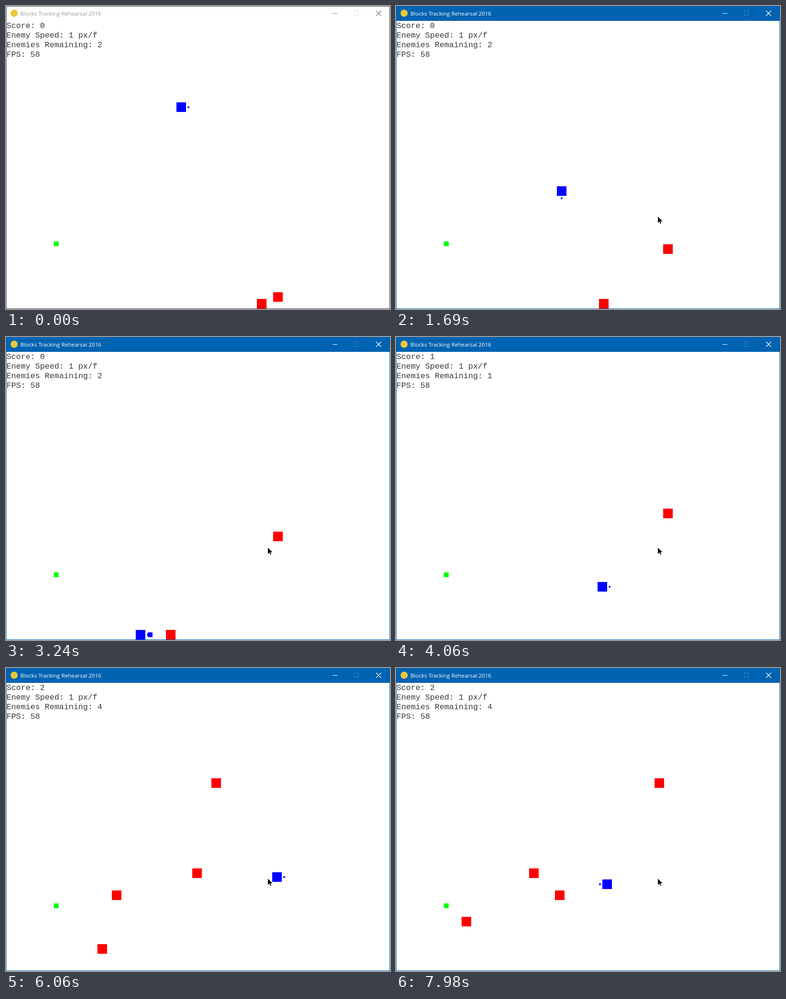
Animation, 802 px wide and 632 px high, one loop 8 s. Source, as an HTML page:

```html
<!DOCTYPE html>
<html lang="en">
<head>
<meta charset="utf-8">
<title>Blocks Tracking Rehearsal 2016</title>
<style>
  html, body { margin: 0; width: 100%; height: 100%; overflow: hidden; background: #fff; }
  svg { display: block; width: 802px; height: 632px; }
  .title { font: 11.65px "Open Sans", "Noto Sans", sans-serif; }
  .hud { font: 16.667px "Liberation Mono", "Courier New", monospace; white-space: pre; }
  rect, .crisp { shape-rendering: crispEdges; }
</style>
</head>
<body>
<svg id="stage" viewBox="0 0 802 632">
  <rect width="802" height="632" fill="#fff"/>
  <rect id="bar" width="802" height="31"/>
  <rect id="border" x=".5" y=".5" width="801" height="631" fill="none"/>
  <circle cx="17" cy="15" r="7.5" fill="#e9c63c"/>
  <text id="caption" class="title" x="30" y="20">Blocks Tracking Rehearsal 2016</text>
  <g id="buttons" fill="none">
    <path class="crisp" d="M682 15.5h10"/>
    <path d="M773 10l10.5 10.5M783.5 10l-10.5 10.5" stroke-width="1.2"/>
  </g>
  <rect id="maximize" x="727.5" y="10.5" width="9" height="9" fill="none"/>
  <g id="hud" class="hud" fill="#3a3a3a"></g>
  <rect x="100" y="491" width="10" height="10" fill="#0f0"/>
  <g id="enemies" fill="#f00"></g>
  <g id="bullets" fill="#00f"></g>
  <g id="player" fill="#00f">
    <rect width="20" height="20"/>
    <path id="aim" class="crisp" d="M-1-2h2v1h1v2h-1v1h-2v-1h-1v-2h1z"/>
  </g>
  <path id="cursor" class="crisp" d="M547 440v12l3-3 2 5h2l-2-5h4z"/>
</svg>
<script>
const LOOP = 8000, ACTIVATED = 300, FIRST_HIT = 3280, SECOND_HIT = 5460;
const $ = id => document.getElementById(id);
const DIRS = { R: [1, 0], L: [-1, 0], U: [0, -1], D: [0, 1] };

// time, x, y, facing from that time on
const playerPath = [
  [0, 356, 201, 'R'], [440, 356, 201, 'R'], [647, 416, 201, 'D'],
  [940, 416, 286, 'D'], [1214, 416, 366, 'D'], [1400, 416, 366, 'L'],
  [1650, 346, 366, 'D'], [1940, 261, 451, 'D'], [2400, 261, 451, 'D'],
  [2950, 261, 611, 'D'], [3040, 261, 611, 'R'], [3075, 271, 611, 'R'],
  [3370, 271, 611, 'R'], [3546, 271, 561, 'R'], [3717, 321, 511, 'R'],
  [4060, 421, 511, 'R'], [4660, 596, 511, 'R'], [4850, 596, 511, 'U'],
  [4930, 596, 511, 'U'], [4950, 601, 506, 'U'], [5070, 601, 471, 'U'],
  [5225, 556, 426, 'U'], [6045, 556, 426, 'R'], [6060, 556, 426, 'R'],
  [6270, 616, 426, 'R'], [6340, 616, 426, 'L'], [6560, 551, 426, 'L'],
  [6645, 526, 401, 'L'], [6850, 466, 401, 'L'], [7220, 466, 401, 'D'],
  [7260, 466, 411, 'D'], [7363, 466, 441, 'D'], [7700, 466, 441, 'L'],
  [7820, 431, 441, 'L']
];

// each enemy lives from its first to its last time
const enemyPaths = [
  [[0, 524, 611], [940, 468, 611], [2380, 384, 611], [FIRST_HIT, 332, 611]],
  [[0, 558, 597], [940, 558, 541], [2380, 558, 457], [4060, 558, 358], [SECOND_HIT, 558, 277]],
  [[SECOND_HIT, 394, 230], [6060, 429, 230], [7260, 498, 230], [7980, 540, 230], [LOOP, 541, 230]],
  [[SECOND_HIT, 424, 418], [6060, 389, 418], [7260, 320, 418], [7980, 278, 418], [LOOP, 277, 418]],
  [[SECOND_HIT, 186, 464], [6060, 221, 464], [7260, 290, 464], [7980, 332, 464], [LOOP, 333, 464]],
  [[SECOND_HIT, 191, 611], [6060, 191, 576], [7051, 191, 519], [7260, 179, 519], [7980, 137, 519], [LOOP, 136, 519]]
];

// fired, gone, x, y, direction
const shots = [
  [3235, FIRST_HIT, 296, 616, 'R'], [3350, 3900, 296, 616, 'R'],
  [5327, SECOND_HIT, 561, 411, 'U'], [5420, 5853, 561, 411, 'U'],
  [6955, 7432, 451, 406, 'L']
];

const fasterSpells = [[3500, 3650], [6300, 6450], [6750, 6900], [7600, 7750]];

function add(parent, tag, attrs) {
  const el = document.createElementNS('http://www.w3.org/2000/svg', tag);
  set(el, attrs);
  return parent.appendChild(el);
}

function set(el, attrs) {
  for (const key in attrs) el.setAttribute(key, attrs[key]);
}

function place(path, t) {
  let i = 0;
  while (i < path.length - 1 && path[i + 1][0] <= t) i++;
  const from = path[i], to = path[i + 1] || from;
  const k = to === from ? 0 : (t - from[0]) / (to[0] - from[0]);
  return { x: from[1] + (to[1] - from[1]) * k, y: from[2] + (to[2] - from[2]) * k, dir: from[3] };
}

const snap = v => 5 * Math.round((v - 1) / 5) + 1;
const show = (el, on) => set(el, { visibility: on ? 'visible' : 'hidden' });

const lines = [0, 1, 2, 3].map(i => add($('hud'), 'text', { x: 1, y: 46 + 20 * i }));
const enemies = enemyPaths.map(() => add($('enemies'), 'rect', { width: 20, height: 20 }));
const bullets = shots.map(() => add($('bullets'), 'rect', { width: 10, height: 10 }));

function drawWindow(active) {
  set($('bar'), { fill: active ? '#0063b1' : '#fff' });
  set($('border'), { stroke: active ? '#0063b1' : '#3c3c3c' });
  set($('caption'), { fill: active ? '#fff' : '#999' });
  set($('buttons'), { stroke: active ? '#fff' : '#777' });
  set($('maximize'), { stroke: active ? '#3383c1' : '#e2e2e2' });
  show($('cursor'), active);
}

function drawHud(t) {
  const score = (t >= FIRST_HIT) + (t >= SECOND_HIT);
  const fps = fasterSpells.some(([a, b]) => t >= a && t < b) ? 59 : 58;
  [`Score: ${score}`, 'Enemy Speed: 1 px/f', `Enemies Remaining: ${[2, 1, 4][score]}`, `FPS: ${fps}`]
    .forEach((text, i) => { if (lines[i].textContent !== text) lines[i].textContent = text; });
}

function draw(t) {
  drawWindow(t >= ACTIVATED);
  drawHud(t);

  const { x, y, dir } = place(playerPath, t);
  const [dx, dy] = DIRS[dir];
  set($('player'), { transform: `translate(${snap(x)} ${snap(y)})` });
  set($('aim'), { transform: `translate(${10 + 15 * dx} ${10 + 15 * dy})` });

  enemies.forEach((el, i) => {
    const path = enemyPaths[i], p = place(path, t);
    show(el, t >= path[0][0] && t < path[path.length - 1][0]);
    set(el, { x: Math.round(p.x), y: Math.round(p.y) });
  });

  bullets.forEach((el, i) => {
    const [fired, gone, x0, y0, way] = shots[i];
    const travel = 15 * Math.floor((t - fired) * 0.06);
    show(el, t >= fired && t < gone);
    set(el, { x: x0 + DIRS[way][0] * travel, y: y0 + DIRS[way][1] * travel });
  });
}

function tick() {
  draw(performance.now() % LOOP);
  requestAnimationFrame(tick);
}
tick();
</script>
</body>
</html>
```
